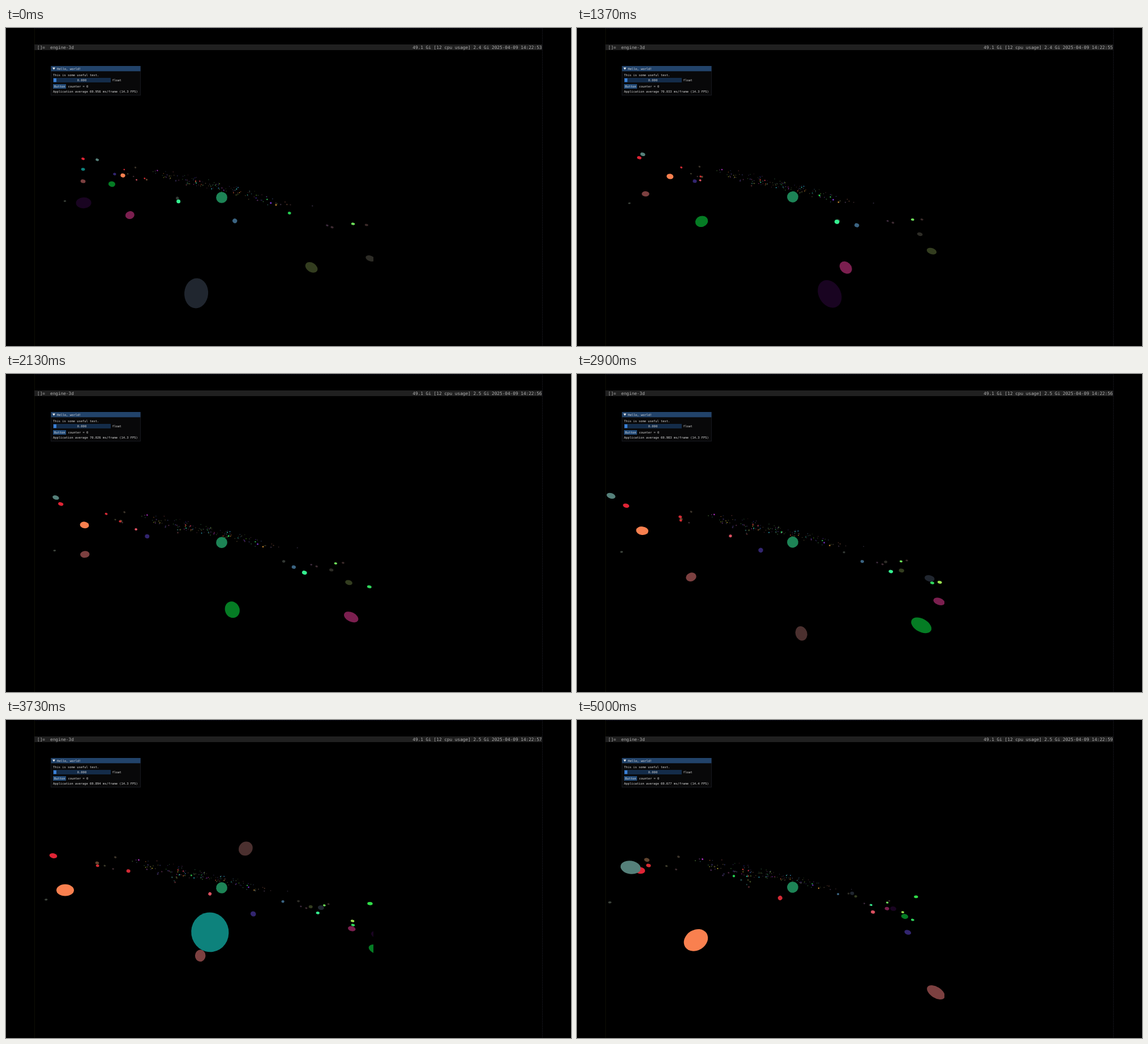
An HTML page with a canvas for the animation above (5.03 s loop, 998 px wide and 561 px high).

```html
<!DOCTYPE html>
<html lang="en">
<head>
<meta charset="utf-8">
<title>engine-3d</title>
<style>
  html, body { margin: 0; width: 100%; height: 100%; overflow: hidden; background: #000; }
  canvas, svg { position: absolute; left: 0; top: 0; width: 998px; height: 561px; }
  text { font-family: "DejaVu Sans Mono", monospace; white-space: pre; }
  .bar { font-size: 7.74px; fill: #b0b0b0; }
  .ui { font-size: 5.42px; fill: #d8d8d8; }
</style>
</head>
<body>
<canvas id="scene" width="998" height="561"></canvas>
<svg viewBox="0 0 998 561">
  <path d="M50.5 0V561" stroke="#0e0e06"/>
  <path d="M947.5 0V561" stroke="#17171f" stroke-dasharray="2 1"/>
  <path d="M50 .5H948" stroke="#0c0c20" stroke-dasharray="2 1"/>
  <rect x="50" y="29" width="897" height="10" fill="#202020"/>
  <g class="bar">
    <text x="55" y="36.6">[]=</text>
    <text x="78" y="36.6">engine-3d</text>
    <text id="status" x="946.5" y="36.6" text-anchor="end"></text>
  </g>
  <rect x="79.5" y="67.5" width="158" height="51" fill="#080809" stroke="#16181e"/>
  <rect x="79.5" y="67" width="158" height="9.3" fill="#22436a"/>
  <path d="M82 69.7h5l-2.5 4z" fill="#eee"/>
  <rect x="83" y="88" width="102" height="8" fill="#142c49"/>
  <rect x="84" y="88.8" width="5" height="6.5" fill="#3b80d6"/>
  <rect x="83" y="99" width="23" height="8" fill="#214a78"/>
  <g class="ui">
    <text x="90" y="73.7">Hello, world!</text>
    <text x="83" y="84.6">This is some useful text.</text>
    <text x="134" y="94" text-anchor="middle">0.000</text>
    <text x="187.5" y="94">float</text>
    <text x="85" y="105">Button</text>
    <text x="109.5" y="105">counter = 0</text>
    <text id="stats" x="83" y="114.4"></text>
  </g>
</svg>
<script>
const LOOP = 5030;
const VIEW = { x: 50, y: 39, w: 599, h: 522, cx: 349.5, cy: 300, focal: 220 };
// Camera space: the star is one unit deep, x runs right and y down.
const STAR = { x: .143, y: -.0136 };
// Bodies sweep faster on the side near the viewer.
const SWING = 1.363;
const ctx = document.getElementById('scene').getContext('2d');
const statusText = document.getElementById('status');
const statsText = document.getElementById('stats');
const orbs = [];

// Phases in degrees at 0 s and 5 s; 0 is nearest the viewer, 90 is right.
// Tilt and roll give the slope of the orbit towards the viewer and to the right.
function orb(color, size, radius, from, to, tilt = .24, roll = .2) {
  orbs.push({ color, size, radius, from, to, tilt, roll });
}

// Large bodies crossing the foreground
orb('#20262f', 4.1, .82, -8, 102);
orb('#190421', 3.9, .8, -31, 72, .225);
orb('#7b1f4f', 2.75, .711, -24, 68.5);
orb('#057c24', 3.5, .73, -52, 59);
orb('#7c4040', 1.8, .82, -45, 5, .18);
orb('#0d827c', 2, .95, -62, 12.7, .066);
orb('#f9804f', 3.7, .84, -77, -14, .19);
orb('#333d1f', 2.6, .695, 8, 92);
orb('#2d2c26', 2.1, .715, 28, 100);

// Bodies turning round on the left
orb('#55807a', 1.9, .9, -65, -16, .1, .3);
orb('#e02435', 1.4, .862, -52.6, -20.3, .125, .3);
orb('#32256f', 1.35, .7, -44, 13, .11, .25);
orb('#d52c32', 1.8, .86, -97, -49, .12);
orb('#63452f', 2, .86, -99, -48, .07, .21);
orb('#d32a35', 1.1, .73, -65.8, -7.6, .095, .28);
orb('#db5060', 1.1, .637, -64, 10.6, .08);
orb('#3d443c', 1, 1, -58.5, -50, .23, .03);

// Inner bodies, and those receding on the right
orb('#35f090', 1.6, .58, -18, 66, .14);
orb('#3b6482', 2.1, .47, -1, 92);
orb('#333834', 1.8, .42, -33, 152);
orb('#25cd51', 2.1, .48, 60, 285);
orb('#6ee05a', 2, 1, 70, 86);
orb('#30d65c', 1.8, .9, 50.5, 69, .24, .25);
orb('#9ae050', 1.8, .9, 38, 73.5, .24, .22);
orb('#30dd48', 2.4, 1, 39, 73, .24, .07);

function random(seed) {
  return () => (seed = seed * 16807 % 2147483647) / 2147483647;
}

const rnd = random(4211);
const between = (low, high) => low + (high - low) * rnd();

// Distant cluster, denser to the left
for (let i = 0; i < 120; i++) {
  const bright = rnd() < .22;
  const color = `hsl(${rnd() * 360 | 0} ${bright ? 60 : 35}% ${bright ? 46 : 21}%)`;
  const radius = between(.35, 1);
  const from = 80 + 175 * Math.pow(rnd(), .7);
  orb(color, between(.9, bright ? 1.8 : 1.5), radius, from, from + 22 / radius, between(.18, .28), between(.17, .29));
}
// Dim outskirts
for (let i = 0; i < 24; i++) {
  const from = between(62, 285);
  orb(`hsl(${rnd() * 360 | 0} 18% 20%)`, between(1.1, 1.9), between(.8, 1.1), from, from + 20, .22, between(.16, .3));
}

function place(o, t) {
  const half = (o.from + (o.to - o.from) * t / 5) * Math.PI / 360;
  const angle = 2 * Math.atan2(SWING * Math.sin(half), Math.cos(half));
  const right = o.radius * Math.sin(angle), near = o.radius * Math.cos(angle);
  const depth = Math.max(.03, 1 - near);
  const scale = VIEW.focal / depth;
  return {
    color: o.color, depth, r: o.size / depth,
    x: VIEW.cx + (STAR.x + right) * scale,
    y: VIEW.cy + (STAR.y + o.roll * right + o.tilt * near) * scale
  };
}

// Wide-angle projection stretches spheres away from the view centre.
function drawBall({ x, y, r, color }) {
  const dx = x - VIEW.cx, dy = y - VIEW.cy;
  const stretch = Math.hypot(1, Math.hypot(dx, dy) / VIEW.focal);
  ctx.fillStyle = color;
  ctx.beginPath();
  ctx.ellipse(x, y, r * stretch, r, Math.atan2(dy, dx), 0, 7);
  ctx.fill();
}

function draw(t) {
  ctx.clearRect(0, 0, 998, 561);
  ctx.save();
  ctx.beginPath();
  ctx.rect(VIEW.x, VIEW.y, VIEW.w, VIEW.h);
  ctx.clip();
  const star = { x: 381, y: 299 - .8 * t, r: 9.8, depth: 1, color: '#1d8456' };
  // One body rises straight past the camera.
  const riser = { x: 302 + 32.5 * t, y: 1261 - 277 * t, r: 5.4 + 1.7 * t, depth: .2, color: '#4b302f' };
  [star, riser, ...orbs.map(o => place(o, t))]
    .sort((a, b) => b.depth - a.depth)
    .forEach(drawBall);
  ctx.restore();

  const second = t < .03 ? 53 : 54 + Math.floor(t + .03);
  const memory = second < 56 ? '2.4' : '2.5';
  statusText.textContent = `49.1 Gi [12 cpu usage] ${memory} Gi 2025-04-09 14:22:${second}`;
  const ms = 70.035 - .031 * (t - 1.6) ** 2;
  statsText.textContent =
    `Application average ${ms.toFixed(3)} ms/frame (${(1000 / ms).toFixed(1)} FPS)`;
}

const start = performance.now();
function tick() {
  const ms = (performance.now() - start) % LOOP;
  draw(Math.floor(ms * .03 + .2) / 30);
  requestAnimationFrame(tick);
}
tick();
</script>
</body>
</html>
```
